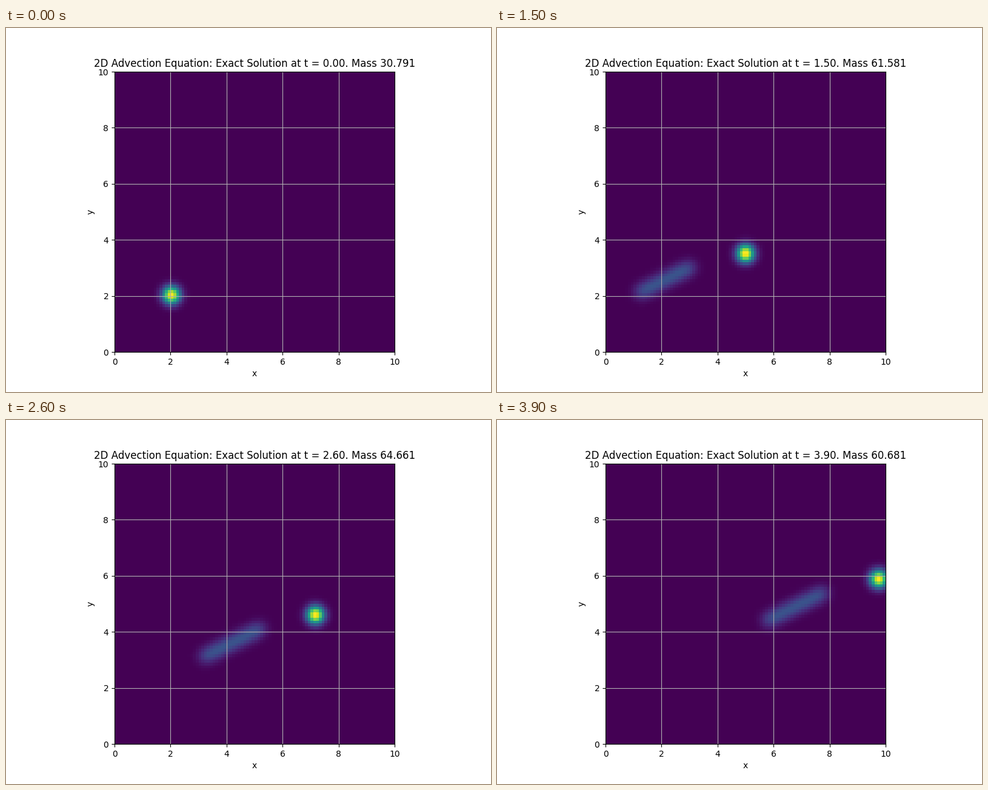
A matplotlib script for the animation above (4000 ms loop, 800 px wide and 600 px high).

```python
import matplotlib.pyplot as plt
import numpy as np
from matplotlib.animation import FuncAnimation

SIZE = 10.0
CELLS = 100
FRAMES = 40
DT = 0.1
VX, VY = 2.0, 1.0
START = (2.0, 2.0)
EMITTER = (1.0, 2.0)
EMIT_FIRST, EMIT_LAST = 5, 15  # steps during which the emitter is on

axis = np.linspace(0, SIZE, CELLS)
X, Y = np.meshgrid(axis, axis)


def puff(origin, age):
    """Gaussian released at origin and carried by the flow for age."""
    x0 = origin[0] + VX * age
    y0 = origin[1] + VY * age
    return np.exp(-10 * ((X - x0) ** 2 + (Y - y0) ** 2))


def solution(step):
    u = puff(START, step * DT)
    for s in range(EMIT_FIRST, min(step, EMIT_LAST + 1)):
        u += DT * puff(EMITTER, (step - s) * DT)
    return u


fig, ax = plt.subplots(figsize=(8, 6), dpi=100)
image = ax.imshow(solution(0), extent=(0, SIZE, 0, SIZE), origin="lower",
                  cmap="viridis")
title = ax.set_title("")
ax.set_xlabel("x")
ax.set_ylabel("y")
ax.grid(True)


def update(step):
    u = solution(step)
    image.set_data(u)
    image.set_clim(u.min(), u.max())
    title.set_text(f"2D Advection Equation: Exact Solution at "
                   f"t = {step * DT:.2f}. Mass {u.sum():.3f}")
    return image, title


anim = FuncAnimation(fig, update, frames=FRAMES, interval=100,
                     repeat=True, repeat_delay=0)
plt.show()
```
